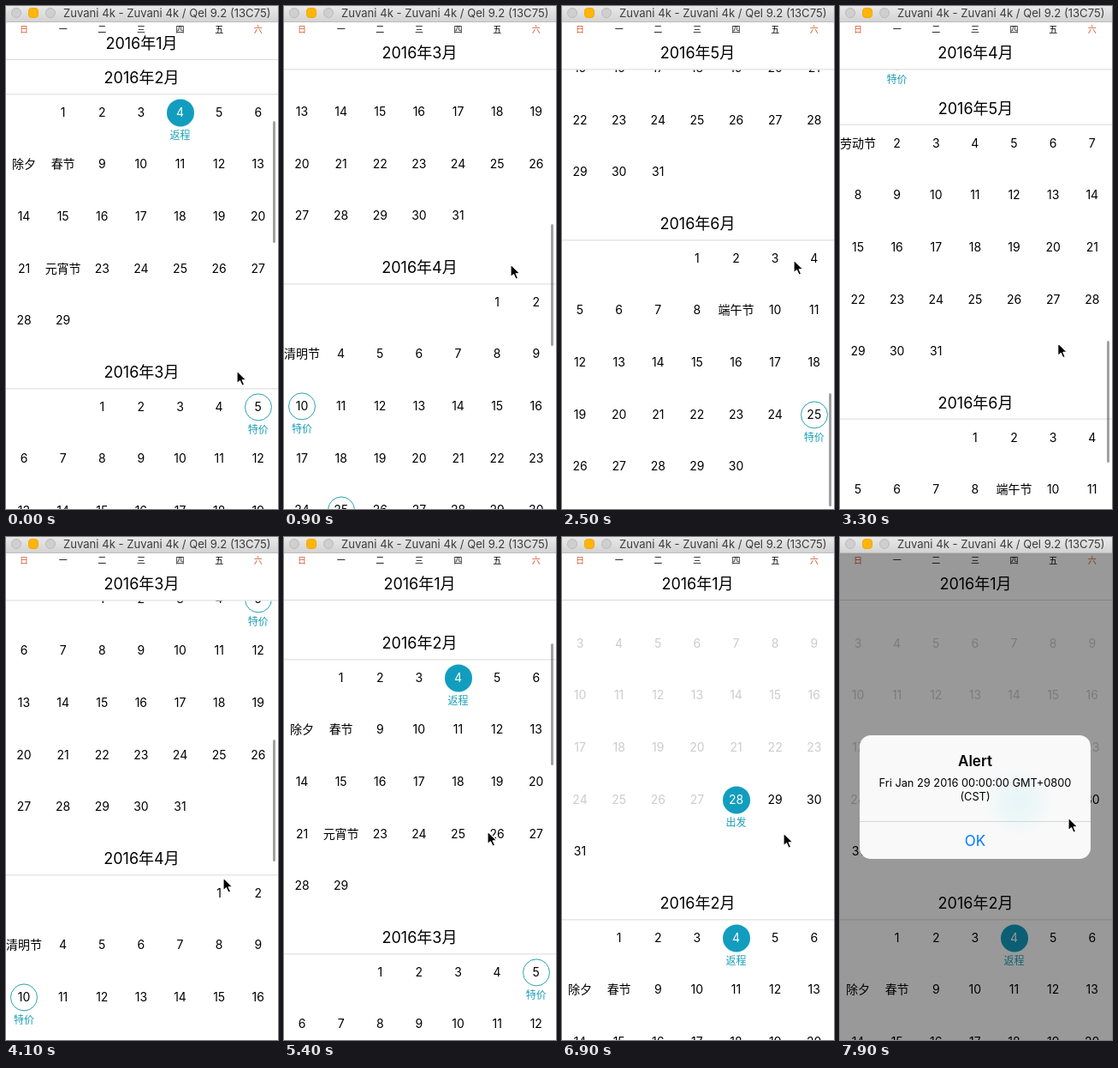
An HTML page that plays this animation: 318x586 px, repeating every 8000 ms.

```html
<!DOCTYPE html>
<html lang="zh">
<head>
<meta charset="utf-8">
<title>Calendar</title>
<style>
  html, body { margin: 0; width: 100%; height: 100%; overflow: hidden; background: #fff; }
  body { position: relative; font: 14px Inter, "Noto Sans CJK SC", "Noto Sans CJK", sans-serif; color: #000; }
  body * { position: absolute; box-sizing: border-box; white-space: nowrap; }
  #stage { left: 0; top: 0; width: 318px; height: 586px; overflow: hidden; background: #fff; }

  #bar { left: 0; top: 0; width: 318px; height: 19px; background: linear-gradient(#e9e9e9, #d3d3d3); border-bottom: 1px solid #bdbdbd; }
  #bar i { top: 2px; width: 12px; height: 12px; border-radius: 50%; background: #cfcfcf; border: 1px solid #bababa; }
  #bar i.on { background: #ffb50a; border-color: #f5a800; border-radius: 4px; }
  #bar span { left: 67px; top: 0; font-size: 13.1px; line-height: 17px; color: #3c3c3c; }

  #week { left: 0; top: 19px; width: 318px; height: 15px; background: #fff; }
  #week b { top: 0; width: 46px; text-align: center; font-weight: 400; font-size: 10px; line-height: 16px; }
  #week b.off { color: #d2572e; }

  #view { left: 0; top: 34px; width: 318px; height: 552px; overflow: hidden; }
  #list, .month { left: 0; width: 318px; }
  #list { top: 0; }
  .head { left: 0; top: 0; width: 318px; height: 40px; z-index: 1; background: #fff; border-bottom: 1px solid #d9d9d9; text-align: center; font-size: 18px; line-height: 41px; padding-right: 1px; }
  .day { width: 60px; height: 32px; text-align: center; line-height: 32px; }
  .day span { left: 0; width: 60px; }
  .day em { left: 0; top: 34px; width: 60px; font-style: normal; font-size: 12px; line-height: 17px; color: #1a9fb8; }
  .day i { left: 14px; top: 0; width: 32px; height: 32px; border-radius: 50%; border: 1.3px solid #2aa0b2; }
  .past { color: #ccc; }
  .pick span { color: #fff; }
  .pick i { background: #129dbf; border: 0; }
  #thumb { left: 312px; width: 3px; border-radius: 2px; background: rgba(0, 0, 0, .37); }

  #dim { left: 0; top: 19px; width: 318px; height: 567px; background: rgba(0, 0, 0, .4); }
  #alert { left: 23px; top: 231px; width: 270px; height: 144px; border-radius: 13px; text-align: center;
    background: radial-gradient(circle at 186px 77px, #e6f5f7 0, #edf7f8 20px, #f9f9f9 40px); }
  #alert div { left: 0; width: 270px; }
  #alert .title { top: 19px; font-size: 17px; font-weight: 600; line-height: 22px; }
  #alert .text { top: 48px; font-size: 12.8px; line-height: 16px; }
  #alert .ok { top: 100px; height: 44px; border-top: 1px solid #d4d6d8; font-size: 17px; line-height: 44px; color: #007aff; }
  #cursor { left: 0; top: 0; overflow: visible; }
</style>
</head>
<body>
<div id="stage">
  <div id="view"><div id="list"></div></div>
  <div id="week"></div>
  <div id="thumb"></div>
  <div id="bar">
    <i style="left:6px"></i><i class="on" style="left:26px"></i><i style="left:46px"></i>
    <span>Zuvani 4k - Zuvani 4k / Qel 9.2 (13C75)</span>
  </div>
  <div id="dim"></div>
  <div id="alert">
    <div class="title">Alert</div>
    <div class="text">Fri Jan 29 2016 00:00:00 GMT+0800<br>(CST)</div>
    <div class="ok">OK</div>
  </div>
  <svg id="cursor" width="14" height="20"><path d="M0 0V15L3.5 11.8L6 17.2L8.6 16L6.2 10.8H11Z" fill="#000" stroke="#fff" stroke-width="1.2" stroke-linejoin="round"/></svg>
</div>
<script>
const LOOP = 8000, STEP = 100;
const VIEW = 552, HEAD = 40, ROW = 60.6;
const COL0 = 21, COL = 45.63;
const $ = id => document.getElementById(id);

const holidays = { '1-1': '元旦', '2-7': '除夕', '2-8': '春节', '2-22': '元宵节', '4-3': '清明节', '5-1': '劳动节', '6-9': '端午节' };
const picks = { '1-28': '出发', '2-4': '返程' };
const deals = ['3-5', '4-10', '4-25', '6-25'];

function add(parent, tag, cls, text) {
  const el = document.createElement(tag);
  if (cls) el.className = cls;
  if (text) el.textContent = text;
  return parent.appendChild(el);
}

[...'日一二三四五六'].forEach((name, i) => {
  const el = add($('week'), 'b', i % 6 ? '' : 'off', name);
  el.style.left = COL0 + COL * i - 23 + 'px';
});

// Month sections, stacked from the top of the list
const months = [];
let total = 0;
for (let m = 1; m <= 6; m++) {
  const first = new Date(2016, m - 1, 1).getDay();
  const count = new Date(2016, m, 0).getDate();
  const height = HEAD + Math.ceil((first + count) / 7) * ROW;
  const box = add($('list'), 'div', 'month');
  box.style.top = total + 'px';
  box.style.height = height + 'px';
  const head = add(box, 'div', 'head', `2016年${m}月`);
  for (let d = 1; d <= count; d++) addDay(box, m, d, first + d - 1);
  months.push({ top: total, height, head });
  total += height;
}

function addDay(box, m, d, slot) {
  const key = m + '-' + d;
  const pick = picks[key], deal = deals.includes(key);
  const cell = add(box, 'div', 'day' + (pick ? ' pick' : m === 1 && d < 28 ? ' past' : ''));
  cell.style.left = COL0 + COL * (slot % 7) - 30 + 'px';
  cell.style.top = 45.2 + ROW * Math.floor(slot / 7) + 'px';
  if (pick || deal) {
    add(cell, 'i');
    add(cell, 'em', '', pick || '特价');
  }
  add(cell, 'span', '', holidays[key] || String(d));
}

// Keys are [time, value, ...]; monotone cubic curve through them
function curve(keys, t, k = 1) {
  const last = keys.length - 1;
  if (t >= keys[last][0]) return keys[last][k];
  let i = 0;
  while (t >= keys[i + 1][0]) i++;
  const slope = j => (keys[j + 1][k] - keys[j][k]) / (keys[j + 1][0] - keys[j][0]);
  const tangent = j => {
    if (j === 0) return slope(0);
    if (j === last) return 0;
    const a = slope(j - 1), b = slope(j);
    return a * b <= 0 ? 0 : 2 * a * b / (a + b);
  };
  const [a, b] = [keys[i], keys[i + 1]];
  const h = b[0] - a[0], u = (t - a[0]) / h, v = 1 - u;
  return a[k] * (1 + 2 * u) * v * v + tangent(i) * h * u * v * v
    + b[k] * u * u * (3 - 2 * u) - tangent(i + 1) * h * u * u * v;
}

const scroll = [[0, 374.6], [400, 570], [900, 839.6], [1300, 970], [1900, 1340], [2500, 1576.6],
  [2800, 1566.6], [3000, 1566.6], [3500, 1180], [4100, 769.6], [4700, 560], [5400, 334.6],
  [5900, 95], [6300, 31.6], [8000, 31.6]];
const mouse = [[0, 270, 425], [500, 265, 301], [900, 265, 301], [1400, 269, 380], [1900, 271, 296],
  [2600, 271, 296], [3400, 254, 397], [4100, 254, 397], [4800, 243, 300], [5400, 238, 343],
  [5900, 250, 400], [6500, 259, 345], [6900, 259, 345], [7200, 252, 309], [7400, 252, 309],
  [7800, 267, 327], [8000, 267, 327]];

const ramp = (t, from, to) => Math.min(1, Math.max(0, (t - from) / (to - from)));

function draw(t) {
  const s = curve(scroll, t);
  $('list').style.transform = `translateY(${-s}px)`;
  for (const { top, height, head } of months) {
    const shift = Math.min(Math.max(s - top, 0), height - HEAD);
    head.style.transform = `translateY(${shift}px)`;
  }

  const max = total - VIEW, over = Math.max(0, s - max);
  const size = 142 - over;
  $('thumb').style.height = size + 'px';
  $('thumb').style.top = 37.4 + Math.min(s, max) / max * 403.6 + over + 'px';
  $('thumb').style.opacity = 1 - ramp(t, 6400, 6700);

  const show = ramp(t, 7400, 7700);
  const ease = 1 - (1 - show) ** 3;
  $('dim').style.opacity = $('alert').style.opacity = ease;
  $('alert').style.transform = `scale(${1.2 - .2 * ease})`;

  $('cursor').style.transform = `translate(${curve(mouse, t, 1)}px, ${curve(mouse, t, 2)}px)`;
}

const start = performance.now();
function tick() {
  const t = (performance.now() - start) % LOOP;
  draw(Math.floor(t / STEP) * STEP);
  requestAnimationFrame(tick);
}
tick();
</script>
</body>
</html>
```
